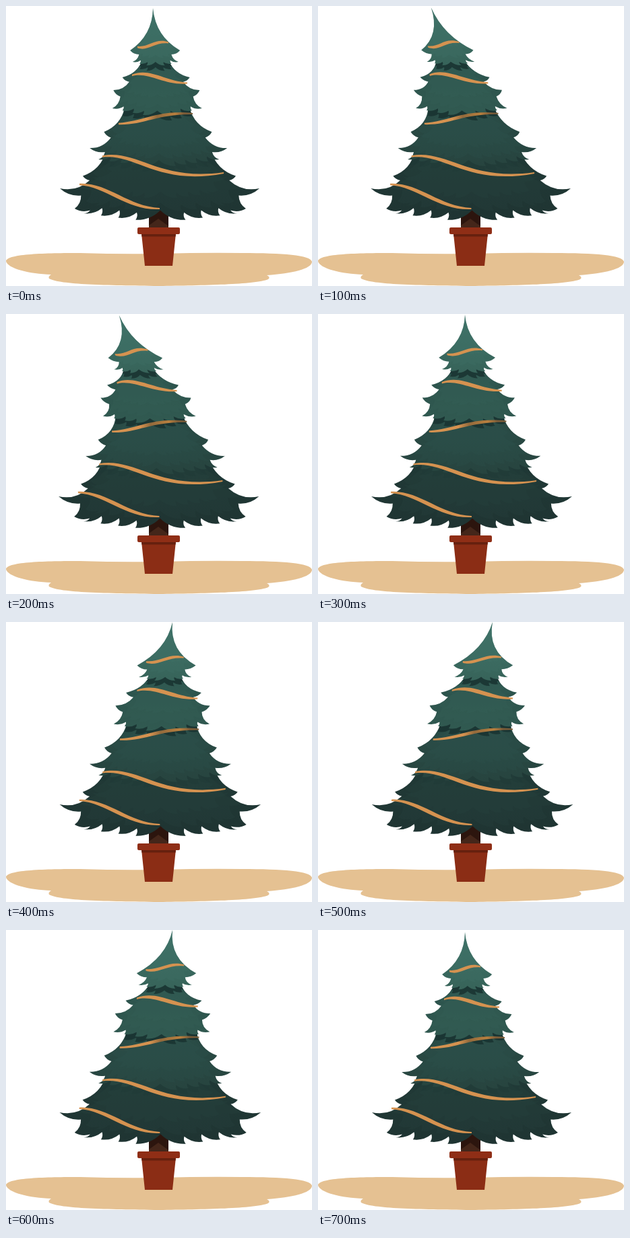
Recreate the animation shown at these times as an HTML page with a canvas. Size 454 px wide and 416 px high, loop 800 ms.

```html
<!DOCTYPE html>
<html lang="en">
<head>
<meta charset="utf-8">
<title>Swaying tree</title>
<style>
html, body { margin: 0; width: 100%; height: 100%; overflow: hidden; background: #fff; }
canvas { display: block; width: 454px; height: 416px; }
</style>
</head>
<body>
<canvas id="stage" width="454" height="416"></canvas>
<script>
const ctx = document.getElementById('stage').getContext('2d');
const STEP = 100, STEPS = 8;
const GOLD = '#d59250';
let lean = 0, widen = 0;

// Quick swing left in three steps, slower one right in four, then a rest
function setPose(step) {
  lean = step < 3 ? -58 * Math.sin(Math.PI * step / 3)
                  : 41 * Math.sin(Math.PI * (step - 3) / 4);
  widen = step < 7 ? Math.min(0.075 * step, 0.33) : 0;
}

const mix = (a, b, t) => a + (b - a) * t;
const axis = y => 218 + 10 * Math.pow(Math.max(0, y - 3) / 268, 0.8);

// Bend grows with the cube of the height above the pot
function warp(x, y) {
  const s = Math.pow(Math.max(0, 386 - y) / 383, 3);
  return [x + lean * s + widen * (x - axis(y)) * s, y - 9 * widen * s];
}

// top and tips are [distance from the axis, y]; teeth fill the hem down to base
const tiers = [
  { fill: ['#213a37', '#1f3432'], glow: '#294641', top: [78, 216],
    tips: [[113.5, 252.5], [148, 271], [127, 301], [114, 308]], teeth: 4, base: 321, depth: 11 },
  { fill: ['#294b45', '#27443f'], glow: '#315850', top: [48, 151],
    tips: [[80, 187], [102, 211], [89.5, 228]], teeth: 5, base: 240, depth: 7 },
  { fill: ['#2b514b', '#315a51'], glow: '#396459', top: [19, 80],
    tips: [[50, 106], [64, 125], [66.5, 152]], teeth: 4, base: 165, depth: 6 },
  { fill: ['#3d7167', '#376359'], glow: '#437569', top: [0, 3],
    tips: [[37, 66], [34, 83]], teeth: 3, base: 91, depth: 5 }
];

// Half outline from top to centre, alternating notch and tip
function halfOutline({ top, tips, teeth, base, depth }) {
  const pts = [top];
  tips.forEach((tip, i) => {
    pts.push(tip);
    const next = tips[i + 1];
    if (next) pts.push([Math.min(tip[0], next[0]) - 10, mix(tip[1], next[1], 0.35)]);
  });
  const [reach, y] = tips[tips.length - 1];
  for (let k = 1; k < teeth; k++) {
    const r = reach * (1 - 0.9 * k / teeth), tipY = mix(y, base, k / teeth);
    pts.push([r - 2, tipY - depth], [r, tipY]);
  }
  pts.push([0, base - 1.6 * depth]);
  return pts;
}
tiers.forEach(t => t.half = halfOutline(t));

function curve(a, b, bend) {
  const mx = (a[0] + b[0]) / 2 - (b[1] - a[1]) * bend;
  const my = (a[1] + b[1]) / 2 + (b[0] - a[0]) * bend;
  ctx.quadraticCurveTo(...warp(mx, my), ...warp(...b));
}

function outline(tier, scale = 1, drop = 0) {
  const top = tier.top[1];
  const side = sign => tier.half.map(([r, y]) =>
    [axis(y) + sign * r * scale, top + (y - top) * scale + drop]);
  const right = side(1), left = side(-1), last = right.length - 1;
  // Upper edges sag inwards, undersides are round
  const bend = i => i % 2 ? -0.22 : 0.26;
  ctx.beginPath();
  ctx.moveTo(...warp(...right[0]));
  for (let i = 0; i < last; i++) curve(right[i], right[i + 1], bend(i));
  for (let i = last - 1; i >= 0; i--) curve(left[i + 1], left[i], bend(i));
  ctx.closePath();
}

function drawTier(tier, above, shade) {
  const paint = ctx.createLinearGradient(0, tier.top[1], 0, tier.base);
  tier.fill.forEach((c, i) => paint.addColorStop(i, c));
  ctx.save();
  outline(tier);
  ctx.fillStyle = paint;
  ctx.fill();
  ctx.clip();
  ctx.fillStyle = tier.glow;
  ctx.globalAlpha = 0.2;
  for (const k of [0.87, 0.68]) {
    outline(tier, k);
    ctx.fill();
  }
  if (above) {
    ctx.globalAlpha = shade;
    ctx.fillStyle = '#17302f';
    outline(above, 1, 8);
    ctx.fill();
  }
  ctx.restore();
}

// Thin at both ends, thicker in the middle
function ribbon([x0, y0], [x1, y1], [x2, y2], [x3, y3], color = GOLD) {
  ctx.beginPath();
  ctx.moveTo(...warp(x0, y0 - 1.2));
  ctx.bezierCurveTo(...warp(x1 + 1, y1 - 3.2), ...warp(x2 + 1, y2 - 3.2), ...warp(x3, y3 - 1));
  ctx.lineTo(...warp(x3, y3 + 1));
  ctx.bezierCurveTo(...warp(x2 - 1, y2 + 3.2), ...warp(x1 - 1, y1 + 3.2), ...warp(x0, y0 + 1.2));
  ctx.closePath();
  ctx.fillStyle = color;
  ctx.fill();
}

// Ribbon colour that dims where it passes under the needles
function shadedGold() {
  const g = ctx.createLinearGradient(warp(167, 174)[0], 0, warp(277, 160)[0], 0);
  g.addColorStop(0.38, GOLD);
  g.addColorStop(0.52, '#936a3c');
  g.addColorStop(0.76, '#b9803f');
  g.addColorStop(0.88, '#7c5c38');
  return g;
}

function shape(color, d) {
  ctx.fillStyle = color;
  ctx.fill(new Path2D(d));
}

function drawGround() {
  shape('#e5c192', 'M0 379C2 368 60 367 110 367Q170 369 227 368Q300 366 350 367C410 367 452 370 454 380' +
    'C453 391 425 397 387 400Q393 403 389 406C370 414 290 415 227 416C150 415 80 414 64 405' +
    'Q62 402 67 399C35 398 2 390 0 379Z');
}

function drawPot() {
  shape('#44261a', 'M212 298H241V331H212Z');
  shape('#2c150e', 'M212 298H241V327L226 316L212 326Z');
  shape('#8b2d15', 'M201 338H252L247 386H206Z');
  shape('#65200f', 'M201 338H252L251.6 342.5H201.4Z');
  shape('#8f2e16', 'M197 329H256Q258 329 258 331V337Q258 339 256 339H197Q195 339 195 337V331Q195 329 197 329Z');
}

function draw(time) {
  setPose(Math.floor(time / STEP) % STEPS);
  ctx.clearRect(0, 0, 454, 416);
  drawGround();
  drawPot();
  const [base, lower, upper, top] = tiers;
  drawTier(base, lower, 0.15);
  ribbon([109, 265], [150, 265], [180, 301], [228, 301]);
  drawTier(lower, upper, 0.8);
  ribbon([143, 223.5], [195, 216], [225, 264], [323, 248]);
  drawTier(upper, top, 0.8);
  ribbon([167, 175], [205, 174], [225, 157], [277, 160], shadedGold());
  ribbon([187, 103], [212, 94], [235, 115], [269, 114.5]);
  drawTier(top);
  ribbon([195, 61], [211, 65], [221, 50], [241, 54.5]);
}

function tick() {
  draw(performance.now());
  requestAnimationFrame(tick);
}
tick();
</script>
</body>
</html>
```
